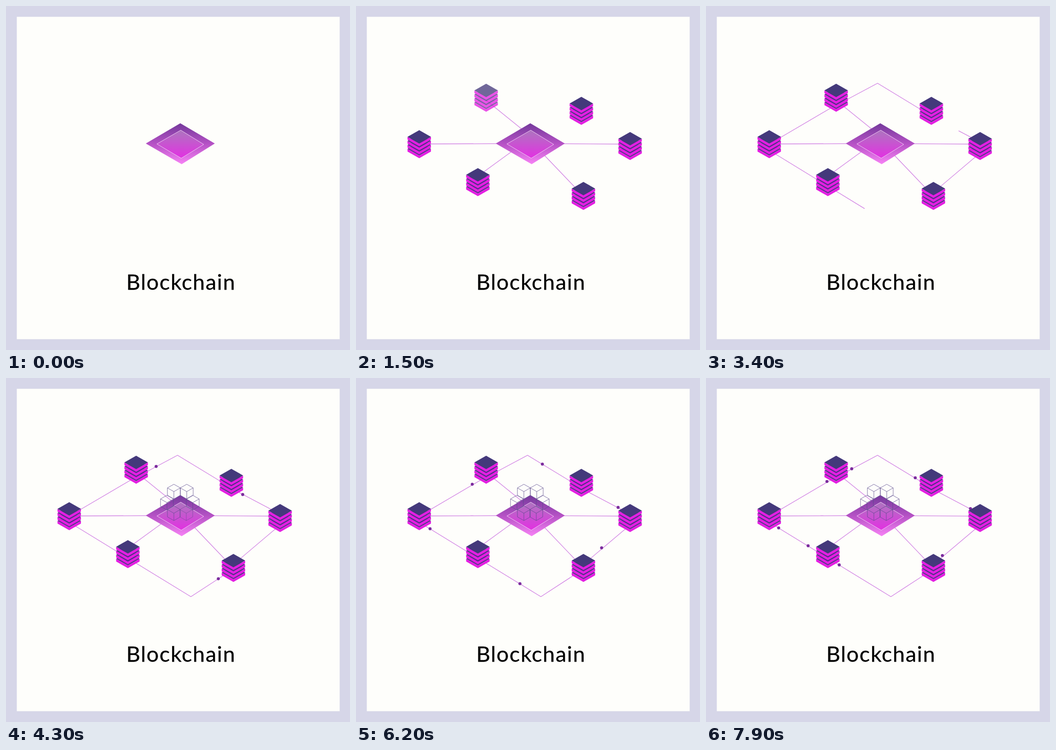
Animation of 748x748 px, one loop 8 s. Source, as an HTML page:

```html
<!DOCTYPE html>
<html lang="en">
<head>
<meta charset="utf-8">
<title>Blockchain</title>
<style>
  html, body { margin: 0; width: 100%; height: 100%; overflow: hidden; background: #d6d6e8; }
  svg { display: block; width: 748px; height: 748px; }
  text { font: 47px Lato, "Open Sans", sans-serif; letter-spacing: 1.6px; text-anchor: middle;
         stroke: #000; stroke-width: .3px; stroke-linejoin: round; }
  .line { fill: none; stroke: #d07fe3; stroke-width: 1.3; }
  .cube { fill: none; stroke: #5c4a8c; stroke-opacity: .8; stroke-width: 1; stroke-linejoin: round; }
</style>
</head>
<body>
<svg viewBox="0 0 748 748">
  <defs>
    <linearGradient id="outer" x2="0" y2="1">
      <stop stop-color="#74399b"/><stop offset=".5" stop-color="#b552c5"/><stop offset="1" stop-color="#f782f5"/>
    </linearGradient>
    <linearGradient id="inner" x2="0" y2="1">
      <stop stop-color="#ad76bf"/><stop offset=".9" stop-color="#de37df"/>
    </linearGradient>
  </defs>
  <rect x="23.5" y="23.5" width="702" height="701" fill="#fefefb"/>
  <g id="lines"></g>
  <g id="dots"></g>
  <path d="M379 255 454 299 382 344 304 299Z" fill="url(#outer)"/>
  <path d="M380 270 430 301 381 331 328 300Z" fill="url(#inner)" stroke="#f2cdf6"/>
  <g id="cubes"></g>
  <g id="stacks"></g>
  <text x="380.5" y="616.5">Blockchain</text>
</svg>
<script>
const LOOP = 8000, STEP = 100;
const parts = [];   // functions of time that pose one element each

const add = (parent, tag, attrs) => {
  const el = document.createElementNS('http://www.w3.org/2000/svg', tag);
  for (const key in attrs) el.setAttribute(key, attrs[key]);
  return parent.appendChild(el);
};
const layer = id => document.getElementById(id);
const progress = (t, start, dur) => Math.min(1, Math.max(0, (t - start) / dur));
const linear = u => u;
const sine = u => (1 - Math.cos(Math.PI * u)) / 2;
const slowing = u => 1 - (1 - u) ** 1.25;

function growLine(d, start, dur, ease = linear) {
  const el = add(layer('lines'), 'path', { d, pathLength: 1, class: 'line' });
  parts.push(t => {
    const u = ease(progress(t, start, dur));
    el.style.display = u > 0 ? '' : 'none';
    el.setAttribute('stroke-dasharray', u < 1 ? `${u} 2` : 'none');
  });
}

function travel(d, start, dur, ease = sine) {
  const track = document.createElementNS('http://www.w3.org/2000/svg', 'path');
  track.setAttribute('d', d);
  const length = track.getTotalLength();
  const el = add(layer('dots'), 'circle', { r: 3.3, fill: '#7b2c9d' });
  parts.push(t => {
    const p = track.getPointAtLength(length * ease(progress(t, start, dur)));
    el.setAttribute('cx', p.x);
    el.setAttribute('cy', p.y);
    el.style.display = t > start ? '' : 'none';
  });
}

function fadeIn(el, start, dur) {
  parts.push(t => el.setAttribute('opacity', progress(t, start, dur)));
}

function stack(x, y, start) {
  const g = add(layer('stacks'), 'g', { transform: `translate(${x} ${y})` });
  for (let i = 3; i >= 0; i--) {
    const slab = add(g, 'g', { transform: `translate(0 ${i * 8.7})` });
    add(slab, 'path', { d: 'M-25.5 14.5 0 29 25.5 14.5V20.5L0 35-25.5 20.5Z', fill: '#e41fe2' });
    add(slab, 'path', { d: 'M0 0 25.5 14.5 0 29-25.5 14.5Z', fill: i ? '#55308a' : '#44397b' });
  }
  fadeIn(g, start, 250);
}

function cube(x, y, start) {
  const el = add(layer('cubes'), 'path', {
    class: 'cube', transform: `translate(${x} ${y})`,
    d: 'M0-16 14-8V8L0 16-14 8V-8ZM-14-8 0 0 14-8M0 0V16'
  });
  fadeIn(el, start, 300);
}

// Spokes from the centre
for (const d of ['M380 299 142 300', 'M380 299 596 300.5', 'M398 298 283 205',
                 'M368 281 495 414', 'M368 295 265 370'])
  growLine(d, 505, 900, sine);

// Outer ring
growLine('M490 239 373 168 283 216', 1920, 1290);
growLine('M283 215 138 300', 2250, 900);
growLine('M495 405 596 319.5 V296 L490 240', 2280, 1480);
growLine('M138 314 402 475.5 495 415', 2500, 1560);

[[490, 197.5, 50], [596, 274, 320], [494.5, 382.5, 590],
 [265, 352.5, 950], [137.5, 270, 1130], [283, 169, 1310]].forEach(s => stack(...s));

[[365, 247], [393, 247], [350, 271], [406, 271], [365, 294], [392, 294]]
  .forEach(([x, y], i) => cube(x, y, 3700 + i * 80));

// Dots run clockwise from stack to stack
const topTrack = 'M308 202 373 168 455 217';
const leftTrack = 'M247 380 158 326';
travel('M145 295 263 225', 3940, 2790);
travel(topTrack, 3900, 4000, slowing);
travel('M510 251 575 284', 3790, 2940);
travel('M596 318 514 386', 3860, 3490);
travel('M475 428 402 475 289 406', 3510, 4560);
travel(leftTrack, 4015, 2477);
travel(leftTrack, 7020, 2477);
travel(topTrack, 7710, 4000, slowing);

const origin = performance.now();
function draw() {
  const t = (performance.now() - origin) % LOOP;
  const stepped = Math.floor(t / STEP) * STEP;
  parts.forEach(pose => pose(stepped));
  requestAnimationFrame(draw);
}
draw();
</script>
</body>
</html>
```
